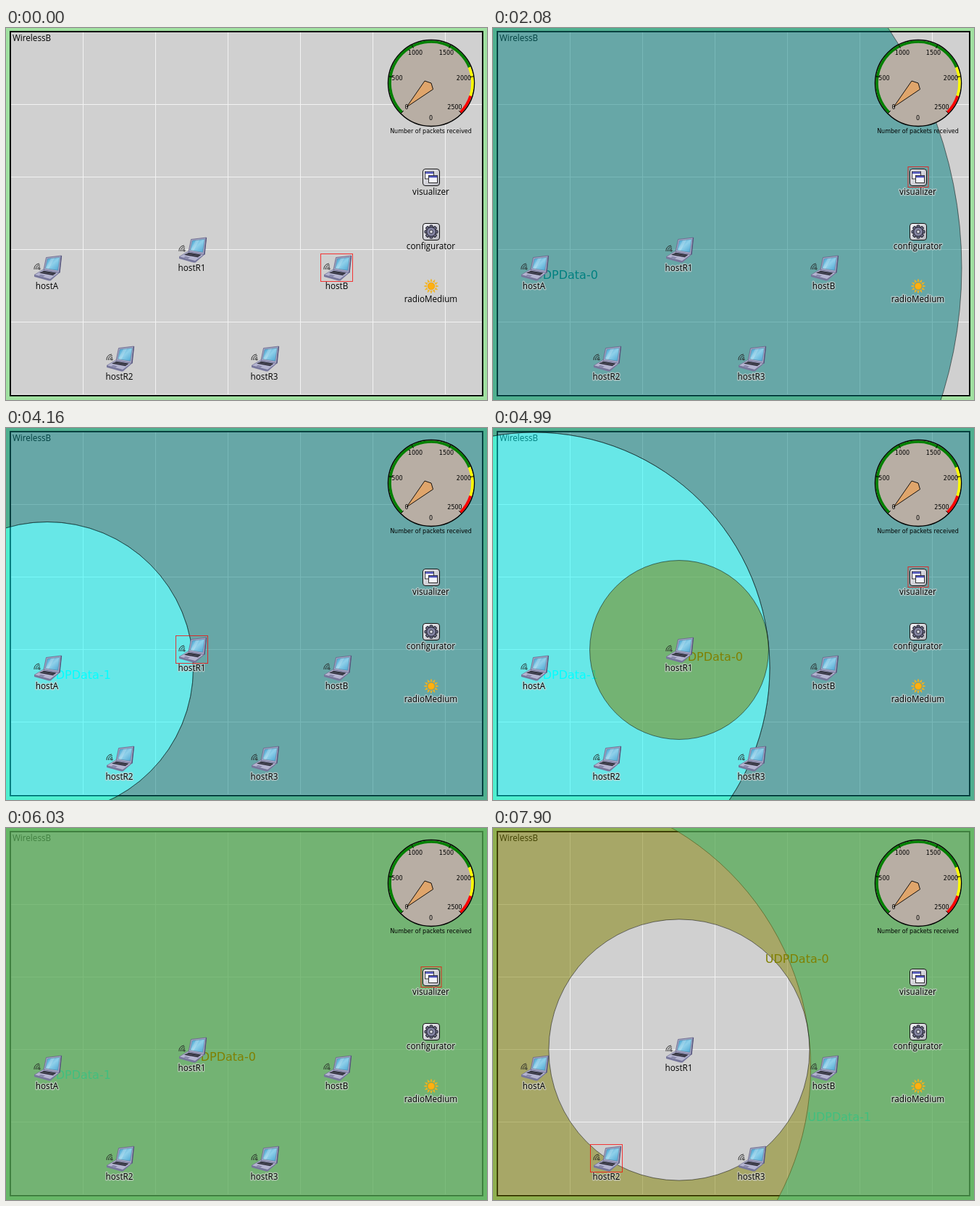
An HTML page for the animation above (8 s loop, 664 by 513 pixels).

```html
<!DOCTYPE html>
<html lang="en">
<head>
<meta charset="utf-8">
<title>Wireless network simulation</title>
<style>
  html, body { margin: 0; width: 100%; height: 100%; overflow: hidden; background: #a0e0a0; }
  svg { display: block; width: 664px; height: 513px; }
  .name { font: 11.7px "Open Sans", "Noto Sans", sans-serif; }
  .halo { text-anchor: middle; paint-order: stroke; stroke: #d2d2d2; stroke-opacity: .6; stroke-width: 3px; stroke-linejoin: round; }
  .dial { font: 8px "DejaVu Sans", sans-serif; text-anchor: middle; }
  .packet { font: 16px "DejaVu Sans", sans-serif; }
  .signal { fill-opacity: .5; fill-rule: evenodd; stroke: #000; stroke-opacity: .5; }
</style>
</head>
<body>
<svg id="stage" viewBox="0 0 664 513">
  <defs>
    <linearGradient id="glass" x1="0" y1="0" x2="1" y2="1">
      <stop offset="0" stop-color="#3f9fd0"/>
      <stop offset=".5" stop-color="#8fd0ea"/>
      <stop offset="1" stop-color="#4aa4d2"/>
    </linearGradient>
    <linearGradient id="plate" x1="0" y1="0" x2="1" y2="1">
      <stop offset="0" stop-color="#f4f4f8"/>
      <stop offset="1" stop-color="#b4b4bc"/>
    </linearGradient>
    <g id="laptop">
      <path d="M-18 9.5 16 4 17.5 6 4.500 17.500 2 17.500-18 12Z" fill="#77779c"/>
      <path d="M-5.500 2 17 6 4 15.500-18 9.500Z" fill="#b4b4d0" stroke="#66668c" stroke-width=".6"/>
      <path d="M-5 3.700 12.500 6.800 8 10.300-11 6.800Z" fill="#2c2c38"/>
      <path d="M-9 9 -3 10.400-6 12-12 10.200Z" fill="#8585a8"/>
      <path d="M-9 5.300 10 8.700" stroke="#77778a" stroke-width=".6"/>
      <path d="M-1.500-14.500 19.500-17 16.500 6.500-5 2.500Z" fill="#a6a6c4" stroke="#62628a" stroke-width=".8"/>
      <path d="M19.500-17 17 6.500" stroke="#55557c" stroke-width="1.300"/>
      <path d="M.3-12.700 17.300-14.700 14.600 3.300-2.700.400Z" fill="url(#glass)" stroke="#4a7898" stroke-width=".5"/>
      <path d="M5-13.200 10-13.800 2 1.200-2 .5Z" fill="#fff" opacity=".22"/>
      <g fill="none" stroke="#222" stroke-width=".9">
        <path d="M-10-1.500a2.500 2.500 0 0 0-3 3.500M-10-4a5 5 0 0 0-5.500 6M-11-6a7 7 0 0 0-7 8"/>
        <circle cx="-10.800" cy="1" r="1"/>
      </g>
    </g>
    <rect id="tile" x="-11.500" y="-11.500" width="23" height="23" rx="3.500" fill="url(#plate)" stroke="#111"/>
  </defs>
  <rect width="664" height="513" fill="#a0e0a0"/>
  <rect x="6" y="5" width="652" height="502" fill="#d0d0d0"/>
  <path id="grid" stroke="#f2f2f2"/>
  <rect x="6" y="5" width="652" height="502" fill="none" stroke="#000" stroke-width="2"/>
  <text class="name" x="9" y="18">WirelessB</text>
  <g id="signals"></g>
  <g id="gauge">
    <circle cx="587" cy="76" r="59.500" fill="#b8aea4" stroke="#000" stroke-width="1.500"/>
  </g>
  <g id="nodes"></g>
  <rect id="box" fill="none" stroke="#f00" stroke-opacity=".75"/>
</svg>
<script>
const $ = id => document.getElementById(id);
const NS = 'http://www.w3.org/2000/svg';

function add(parent, tag, attrs, text) {
  const el = document.createElementNS(NS, tag);
  for (const k in attrs) el.setAttribute(k, attrs[k]);
  if (text) el.textContent = text;
  parent.appendChild(el);
  return el;
}

// Grid
let grid = '';
for (let i = 1; i <= 6; i++) grid += `M${i * 100 + 6.5} 6V506`;
for (let i = 1; i <= 5; i++) grid += `M7 ${i * 100 + 5.5}H657`;
$('grid').setAttribute('d', grid);

// Gauge: 270 degrees for 0 to 2500
const gauge = $('gauge');
const dialPoint = (share, r) => {
  const a = (135 + 270 * share) * Math.PI / 180;
  return [587 + r * Math.cos(a), 76 + r * Math.sin(a)];
};
function band(from, to, color) {
  const big = to - from > 2 / 3 ? 1 : 0;
  add(gauge, 'path', {
    d: `M${dialPoint(from, 57)}A57 57 0 ${big} 1 ${dialPoint(to, 57)}`,
    fill: 'none', stroke: color, 'stroke-width': 3.6
  });
}
band(0, .75, '#008000');
band(.75, .9, '#ffff00');
band(.9, 1, '#ff0000');
for (let i = 0; i <= 5; i++)
  add(gauge, 'path', { d: `M${dialPoint(i / 5, 59)}L${dialPoint(i / 5, 54)}`, stroke: '#000' });
add(gauge, 'path', { d: 'M553 109 578 73 587 76 589.500 84.500Z', fill: '#dfa56b', stroke: '#000', 'stroke-width': .9 });
[[553, 111.5, '0'], [540, 72, '500'], [565, 37, '1000'], [608, 37, '1500'], [632, 72, '2000'],
 [619.5, 111.5, '2500'], [586.5, 127, '0'], [586.5, 145, 'Number of packets received']]
  .forEach(([x, y, s]) => add(gauge, 'text', { class: 'dial', x, y }, s));

// Nodes
const nodes = {
  hostA: [57, 331], hostB: [457, 331], hostR1: [257, 306], hostR2: [157, 456], hostR3: [357, 456],
  visualizer: [587, 206], configurator: [587, 281], radioMedium: [587, 356]
};
const icons = {
  visualizer(g) {
    add(g, 'use', { href: '#tile' });
    [[-8.5, -8], [-3.5, -2.5]].forEach(([x, y]) => {
      add(g, 'rect', { x, y, width: 12, height: 10, fill: '#f4f4fa', stroke: '#222', 'stroke-width': .9 });
      add(g, 'rect', { x: x + .4, y: y + .4, width: 11.2, height: 2.4, fill: '#4a50b8' });
    });
  },
  configurator(g) {
    add(g, 'use', { href: '#tile' });
    for (let a = 0; a < 360; a += 45)
      add(g, 'rect', { x: -2, y: -9, width: 4, height: 5, rx: 1, fill: '#72728e', stroke: '#181824', transform: `rotate(${a})` });
    add(g, 'circle', { r: 6.3, fill: '#8686a4', stroke: '#181824', 'stroke-width': .9 });
    add(g, 'circle', { r: 2.4, fill: '#dcdce4', stroke: '#181824', 'stroke-width': .9 });
  },
  radioMedium(g) {
    for (let a = 0; a < 360; a += 30)
      add(g, 'path', { d: 'M-1.200-6.500H1.200L0-10Z', fill: '#f8b818', stroke: '#f0b020', 'stroke-width': .5, transform: `rotate(${a})` });
    add(g, 'circle', { r: 4.8, fill: '#ffb010', stroke: '#e89a00', 'stroke-width': .7 });
  }
};
const drop = { radioMedium: 22, visualizer: 24, configurator: 24 };
for (const name in nodes) {
  const [x, y] = nodes[name];
  const g = add($('nodes'), 'g', { transform: `translate(${x} ${y})` });
  add(g, 'text', { class: 'name halo', x: -.5, y: drop[name] || 29 }, name);
  if (icons[name]) icons[name](g);
  else add(g, 'use', { href: '#laptop' });
}

// Signals: each has a leading and a trailing front around its sender
const FULL = 900, NONE = -1;
const HOP = Math.hypot(200, 25);

function makeSignal(sender, label, color, angle) {
  const [cx, cy] = nodes[sender];
  const area = add($('signals'), 'path', { class: 'signal', fill: color });
  const text = add($('signals'), 'text', { class: 'packet', fill: color }, label);
  const ring = r => r > .5 && r < FULL
    ? `M${cx - r} ${cy}a${r} ${r} 0 1 0 ${2 * r} 0a${r} ${r} 0 1 0 ${-2 * r} 0Z`
    : r >= FULL ? 'M-9-9H673V522H-9Z' : '';
  const rad = angle * Math.PI / 180;
  return (head, tail) => {
    const gone = head < 0 || tail >= FULL;
    area.setAttribute('d', gone ? '' : ring(head) + ring(tail));
    const r = Math.max(tail, 0);
    const shown = !gone && (tail < 0 || angle !== null);
    text.setAttribute('visibility', shown ? 'visible' : 'hidden');
    text.setAttribute('x', cx + r * Math.cos(rad));
    text.setAttribute('y', cy + 15 + r * Math.sin(rad));
  };
}
const first = makeSignal('hostA', 'UDPData-0', '#008080', null);
const second = makeSignal('hostA', 'UDPData-1', '#00ffff', 8.7);
const relay = makeSignal('hostR1', 'UDPData-0', '#808000', -48.7);

// time, marked node, moving front of hostA, its radius
const V = 'visualizer';
const steps = [
  [0, 'hostB', 0, NONE], [210, 'hostA', 0, NONE],
  [630, V, 0, 0], [840, V, 0, 60], [1040, V, 0, 120], [1250, V, 0, 180], [1460, V, 0, 240],
  [1660, V, 0, 325], [1870, V, 0, 440], [2080, V, 0, 590], [2280, V, 0, FULL],
  [2910, 'hostA', 1, NONE], [3120, V, 1, 0], [3330, V, 1, 40], [3530, V, 1, 80],
  [3740, V, 1, 121], [3950, V, 1, 161], [4160, 'hostR1', 1, 201.5],
  [4580, V, 1, 201.6], [4790, V, 1, 263], [4990, V, 1, 325], [5200, V, 1, 387],
  [5410, V, 1, 450], [5620, V, 1, 525], [5820, V, 1, 630], [6030, V, 1, FULL],
  [6660, 'hostA', 2, 0], [6870, V, 2, 67], [7080, V, 2, 134], [7280, 'hostR1', 2, 201.6],
  [7490, V, 2, 261], [7690, V, 2, 322], [7900, 'hostR2', 2, 381.6]
];

function show([, marked, front, radius]) {
  const fronts = [0, 1, 2].map(i => i < front ? FULL : i > front ? NONE : radius);
  const relayed = r => r >= FULL ? FULL : r < HOP ? NONE : r - HOP;
  first(fronts[0], fronts[1]);
  second(fronts[1], fronts[2]);
  relay(relayed(fronts[1]), relayed(fronts[2]));
  const [x, y] = nodes[marked];
  const [w, h] = marked === V ? [28, 28] : [44, 38];
  const size = { x: x - w / 2 - .5 + (w === 28 ? .5 : 0), y: y - h / 2 - .5, width: w, height: h };
  for (const k in size) $('box').setAttribute(k, size[k]);
}

const start = performance.now();
let current = -1;
function tick() {
  const t = (performance.now() - start) % 8000;
  let i = steps.length - 1;
  while (steps[i][0] > t) i--;
  if (i !== current) show(steps[current = i]);
  requestAnimationFrame(tick);
}
tick();
</script>
</body>
</html>
```
